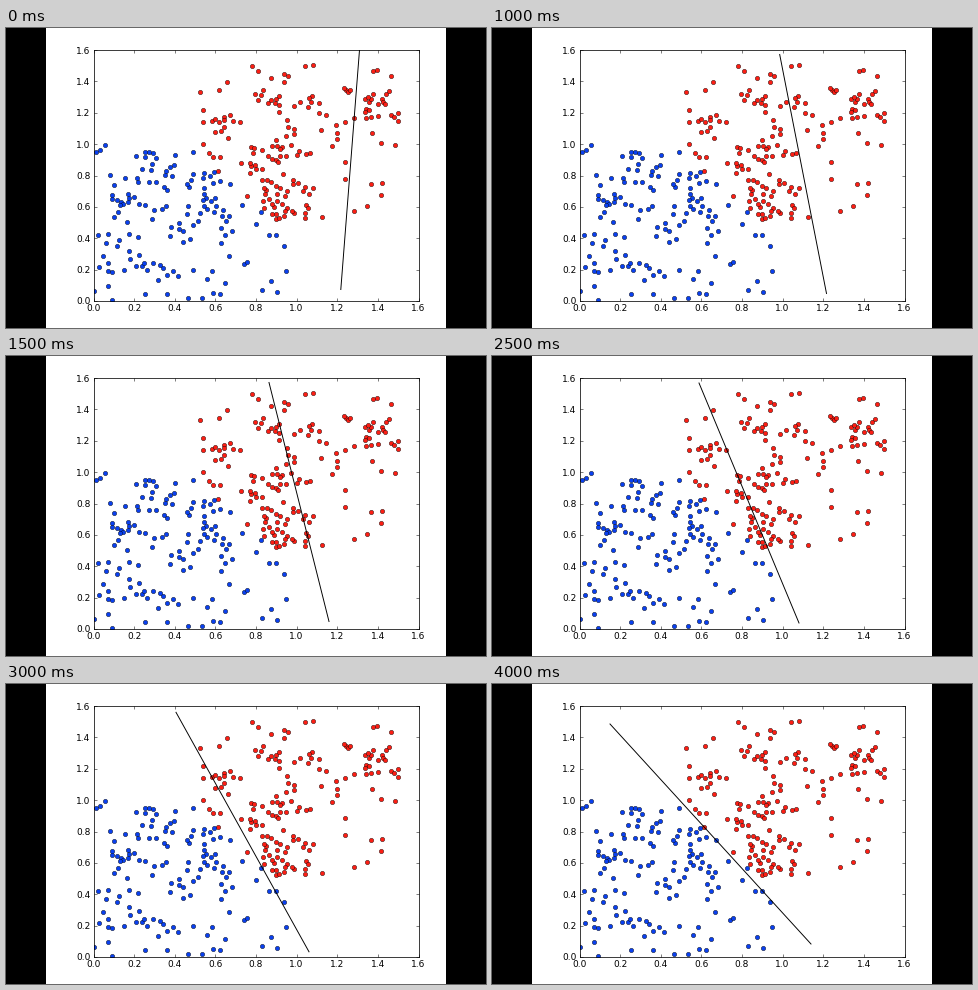
Write a matplotlib script that moves like this. It is 480x300 px and loops after 6000 ms.

```python
import random

import numpy as np
import matplotlib.pyplot as plt
from matplotlib.animation import FuncAnimation
from matplotlib.patches import Rectangle

W, H, DPI = 480, 300, 100
PT = 72 / DPI  # points per pixel
LEFT, RIGHT, TOP, BOTTOM = 87.5, 412.5, 22, 273
RED, BLUE = "#fb1e14", "#0a40ee"

# Outlying points of each class, in stage pixels.
RED_POINTS = [
    (194, 64), (197, 82), (213, 62), (221, 54), (197, 94), (197, 116),
    (203, 125), (214, 129), (212, 143), (241, 168), (246, 38), (252, 43),
    (265, 50), (278, 54), (299, 38), (307, 37), (367, 43), (371, 42),
    (385, 48), (366, 105), (375, 115), (389, 117), (392, 93), (339, 134),
    (331, 105), (348, 90), (339, 151), (365, 156), (376, 155), (375, 167),
    (361, 178), (348, 183), (316, 189), (299, 190), (270, 191), (339, 94),
]
BLUE_POINTS = [
    (90, 124), (94, 122), (99, 117), (104, 147), (92, 207), (97, 228),
    (88, 263), (102, 258), (106, 272), (119, 150), (112, 184), (147, 125),
    (168, 137), (187, 124), (185, 152), (208, 144), (224, 156), (236, 177),
    (255, 184), (250, 196), (263, 207), (270, 207), (278, 218), (280, 243),
    (265, 253), (271, 264), (256, 262), (238, 236), (241, 234), (223, 228),
    (219, 255), (206, 243), (201, 251), (196, 270), (207, 265), (214, 266),
]

# Denser regions: x0, y0, x1, y1, count.
RED_REGIONS = [
    (242, 115, 286, 160, 24), (256, 158, 282, 190, 20),
    (206, 86, 240, 135, 14), (248, 62, 274, 75, 9),
    (264, 76, 332, 130, 20), (288, 68, 322, 80, 7),
    (337, 58, 346, 66, 4), (358, 62, 392, 90, 20),
    (284, 150, 312, 188, 12), (278, 42, 283, 62, 2),
]
BLUE_REGIONS = [
    (128, 123, 172, 160, 18), (106, 156, 162, 196, 20),
    (178, 145, 218, 185, 20), (164, 184, 226, 216, 18),
    (88, 204, 136, 246, 15), (126, 232, 188, 270, 14),
]

# Ends of the separating line at each learning step, in stage pixels.
STEPS = [
    ((353.5, 22), (334.8, 261.5)),
    ((320, 26), (335, 263)),
    ((287.7, 26.5), (334.5, 265.5)),
    ((263, 26.5), (323, 265.5)),
    ((238, 26.5), (310.3, 266)),
    ((207, 27), (307, 267)),
    ((170, 28.3), (303, 267.8)),
    ((120, 35), (325.5, 268.5)),
    ((118, 40), (319, 260)),
]


def to_data(points):
    x, y = np.array(points, float).T
    return (1.6 * (x - LEFT) / (RIGHT - LEFT),
            1.6 * (BOTTOM - y) / (BOTTOM - TOP))


def side(x, y):
    """Signed height above the final boundary."""
    (x0, y0), (x1, y1) = STEPS[-1]
    return y0 + (x - x0) * (y1 - y0) / (x1 - x0) - y


def fill(points, regions, sign, rng):
    points = list(points)
    for x0, y0, x1, y1, count in regions:
        for _ in range(count):
            for _ in range(60):
                x, y = rng.uniform(x0, x1), rng.uniform(y0, y1)
                apart = all(abs(x - a) + abs(y - b) > 4 for a, b in points)
                if apart and sign * side(x, y) < -4:
                    points.append((x, y))
                    break
    return points


fig = plt.figure(figsize=(W / DPI, H / DPI), dpi=DPI, facecolor="black")
fig.add_artist(Rectangle((40 / W, 0), 400 / W, 1, fc="white", lw=0,
                         transform=fig.transFigure, zorder=-1))
ax = fig.add_axes([LEFT / W, 1 - BOTTOM / H,
                   (RIGHT - LEFT) / W, (BOTTOM - TOP) / H])
ax.set(xlim=(0, 1.6), ylim=(0, 1.6))

ticks = np.arange(9) * 0.2
labels = [f"{t:.1f}" for t in ticks]
ax.set_xticks(ticks, labels)
ax.set_yticks(ticks, labels)
ax.tick_params(direction="in", top=True, right=True, length=2.9 * PT,
               width=0.5 * PT, pad=2.9 * PT, labelsize=9 * PT,
               labelfontfamily="DejaVu Sans")
for spine in ax.spines.values():
    spine.set_linewidth(0.75 * PT)

rng = random.Random(7)
for points, regions, sign, color in ((RED_POINTS, RED_REGIONS, -1, RED),
                                     (BLUE_POINTS, BLUE_REGIONS, 1, BLUE)):
    ax.plot(*to_data(fill(points, regions, sign, rng)), "o", color=color,
            ms=4.4 * PT, mec="black", mew=0.4 * PT)

line, = ax.plot([], [], color="black", lw=0.95 * PT, zorder=3)


def update(frame):
    line.set_data(*to_data(STEPS[min(frame, len(STEPS) - 1)]))
    return line,


anim = FuncAnimation(fig, update, frames=12, interval=500,
                     repeat=True, repeat_delay=0, blit=False)
plt.show()
```
